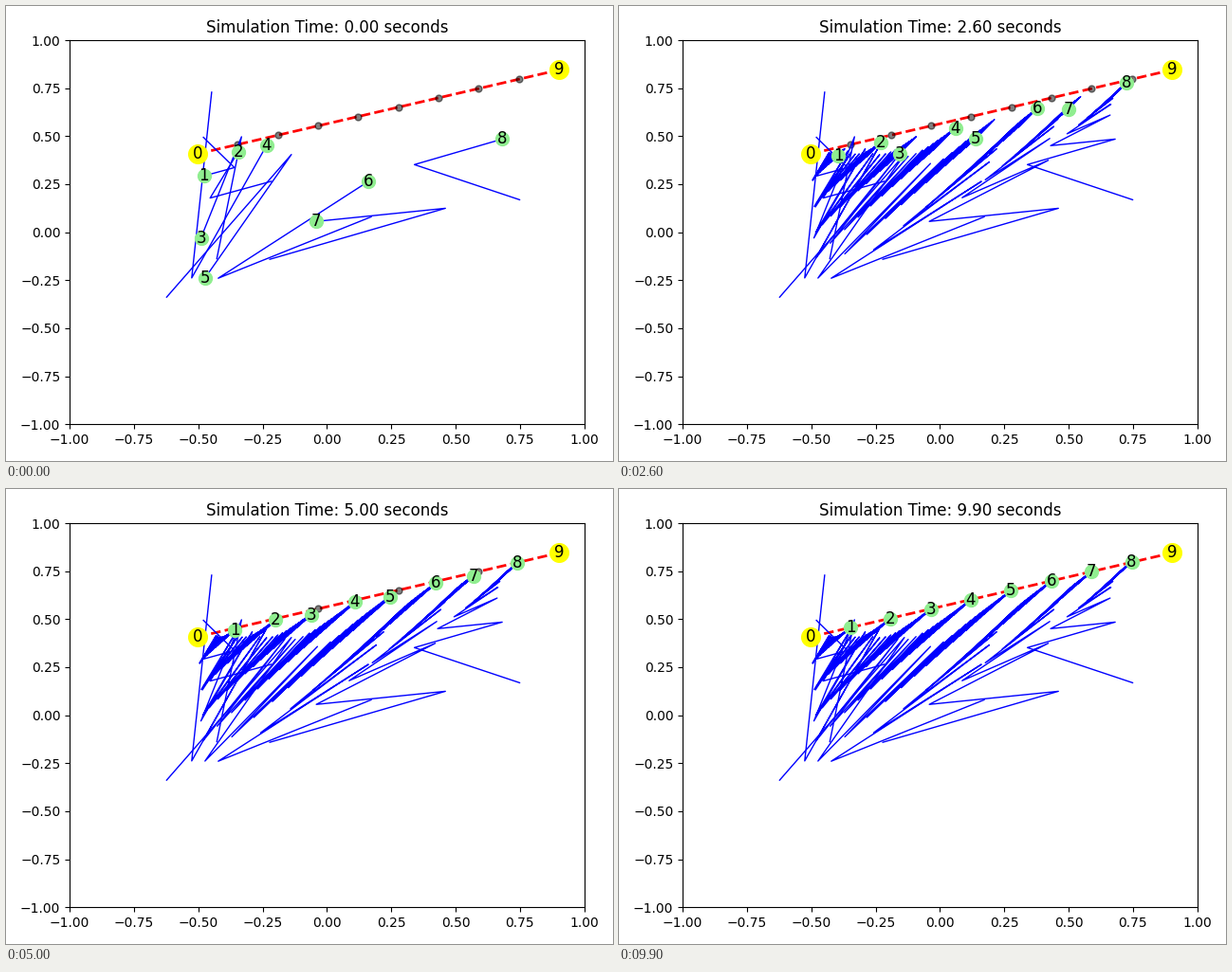
A matplotlib script that plays this animation: 640x480 px, repeating every 10 s.

```python
import numpy as np
import matplotlib.pyplot as plt
from matplotlib.animation import FuncAnimation

FRAMES = 100
DT = 0.1
WARMUP = 2  # steps already taken when the clock shows zero

LEFT, RIGHT = (-0.503, 0.408), (0.902, 0.845)
SCATTER = [(-0.48, 0.494), (-0.216, 0.265), (-0.428, -0.138), (-0.448, 0.729),
           (-0.623, -0.338), (0.172, 0.08), (-0.222, -0.141), (0.749, 0.169)]


def simulate(start, steps):
    """Each inner agent jumps to the midpoint of its two neighbours."""
    path = [start]
    for _ in range(steps):
        pos = path[-1].copy()
        pos[1:-1] = (path[-1][:-2] + path[-1][2:]) / 2
        path.append(pos)
    return np.array(path)


start = np.array([LEFT, *SCATTER, RIGHT])
path = simulate(start, WARMUP + FRAMES)
ends = start[[0, -1]]
goals = np.linspace(LEFT, RIGHT, len(start))[1:-1]

fig, ax = plt.subplots(figsize=(6.4, 4.8), dpi=100)
ax.set(xlim=(-1, 1), ylim=(-1, 1))
title = ax.set_title("Simulation Time: 0.00 seconds")
fig.tight_layout()
fig.subplots_adjust(top=0.925)

ax.plot(*ends.T, "r--", lw=2)
ax.plot(*goals.T, "ko", ms=5, alpha=0.5)
trails = [ax.plot([], [], "b-", lw=1)[0] for _ in goals]
ax.scatter(*ends.T, s=200, c="yellow", zorder=3)
agents = ax.scatter(*start[1:-1].T, s=100, c="lightgreen", zorder=3)
labels = [ax.text(x, y, str(i), size=12, ha="center", va="center", zorder=4)
          for i, (x, y) in enumerate(start)]


def update(frame):
    step = frame + WARMUP
    pos = path[step]
    for i, trail in enumerate(trails, 1):
        trail.set_data(*path[:step + 1, i].T)
    agents.set_offsets(pos[1:-1])
    for label, point in zip(labels, pos):
        label.set_position(point)
    title.set_text(f"Simulation Time: {frame * DT:.2f} seconds")
    return [*trails, agents, *labels, title]


anim = FuncAnimation(fig, update, frames=FRAMES, interval=1000 * DT,
                     repeat=True, repeat_delay=0, blit=False)
plt.show()
```
